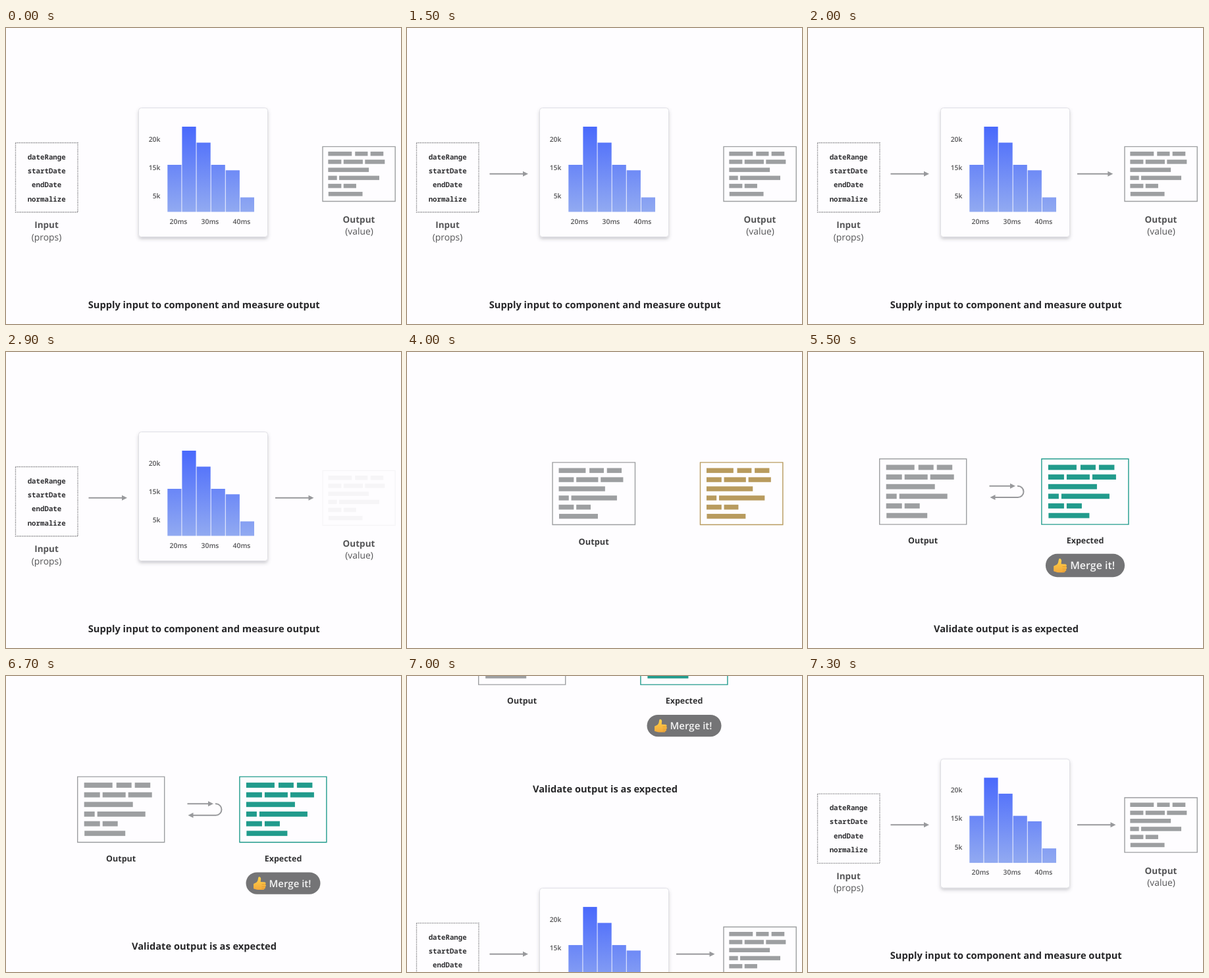
Animation, 600 px wide and 450 px high, one loop 7.4 s. Source, as an HTML page:

```html
<!DOCTYPE html>
<html lang="en">
<head>
<meta charset="utf-8">
<title>Component test flow</title>
<style>
  html, body { margin: 0; width: 100%; height: 100%; overflow: hidden; background: #fefdff; }
  svg { display: block; width: 100%; height: 100%; }
  text { font-family: "Open Sans", "Noto Sans", sans-serif; text-anchor: middle; fill: #555557; text-rendering: geometricPrecision; }
  .caption { font-size: 14.65px; font-weight: 700; fill: #272729; }
  .name { font-size: 13.5px; font-weight: 700; }
  .note { font-size: 13.9px; }
  .axis { font-size: 10.4px; font-weight: 600; }
  .end { text-anchor: end; }
  .code { font: 700 10.75px "Noto Sans Mono", "DejaVu Sans Mono", monospace; fill: #303033; }
  .label { font-size: 12.5px; font-weight: 700; fill: #333335; }
  .merge { font-size: 15px; font-weight: 600; fill: #f4f4f4; text-anchor: start; }
  .line { fill: none; stroke: #98999c; stroke-width: 2; }
  .head { fill: #98999c; }
</style>
</head>
<body>
<svg viewBox="0 0 600 450">
  <defs>
    <linearGradient id="blue" gradientUnits="userSpaceOnUse" x1="0" y1="150" x2="0" y2="280">
      <stop offset="0" stop-color="#4969fc"/>
      <stop offset="1" stop-color="#92aaf1"/>
    </linearGradient>
    <linearGradient id="skin" x1="0" y1="0" x2="0" y2="1">
      <stop offset="0" stop-color="#ffd34a"/>
      <stop offset="1" stop-color="#f2a93b"/>
    </linearGradient>
    <filter id="shadow" x="-10%" y="-10%" width="120%" height="125%">
      <feDropShadow dx="0" dy="3" stdDeviation="2.8" flood-color="#505060" flood-opacity=".28"/>
    </filter>
    <g id="rows"></g>
  </defs>

  <g id="first">
    <g id="parts">
      <rect x="14.5" y="174.5" width="94.5" height="105.5" fill="none" stroke="#77777a" stroke-width="1.3" stroke-dasharray="1.3 1.3"/>
      <g id="props"></g>
      <text class="name" x="61.5" y="304.4">Input</text>
      <text class="note" x="61.5" y="322.9">(props)</text>
      <rect x="201.5" y="121.5" width="196" height="196" rx="4" fill="#fefdff" stroke="#e0e0e5" filter="url(#shadow)"/>
      <g id="bars" fill="url(#blue)"></g>
      <g id="axes"></g>
      <g id="arrowIn"></g>
      <g id="arrowOut"></g>
      <text class="note" x="536.5" y="314.2">(value)</text>
      <text class="caption" x="300.7" y="425.7">Supply input to component and measure output</text>
    </g>
    <g id="result">
      <g id="resultBox"></g>
      <text class="name" x="536" y="296">Output</text>
    </g>
  </g>

  <g id="second">
    <g id="output"></g>
    <g id="expected"></g>
    <text id="outLabel" class="label">Output</text>
    <text id="expLabel" class="label" x="421" y="291">Expected</text>
    <g id="compare">
      <path class="line" d="M275.5 203.7H309M318 203.7h.8a8.7 8.7 0 0 1 0 17.4H283"/>
      <path class="head" d="M307 199.7l8 4-8 4zM284.5 217.1l-8 4 8 4z"/>
    </g>
    <text id="caption" class="caption" x="301" y="425.7">Validate output is as expected</text>
    <g id="pill">
      <rect x="-56.5" y="-16.6" width="113" height="33.2" rx="16.6" fill="#747476"/>
      <path fill="url(#skin)" d="M-45 1L-41-1C-38-3-38.5-6-37.5-9C-37-10.5-34-10-33.8-6.5L-34.3-2L-28.5-1.8C-26-1.5-26 1-27.3 1.8C-25.5 2.5-26 5-27.5 5.2C-26.5 6.5-27 8-28.6 8.2C-28.4 9.5-29.5 10-31 10H-38C-41 10-43 8.5-45 8.2Z"/>
      <path fill="none" stroke="#d98f2c" stroke-width=".7" d="M-32.5 1.8h5M-32.5 5.2h5M-32.5 8.2h4"/>
      <text class="merge" x="-21.5" y="5.5">Merge it!</text>
    </g>
  </g>
</svg>
<script>
const LOOP = 7400;
const GRAY = [157, 159, 161], GOLD = [184, 155, 94], TEAL = [33, 155, 140];
const $ = id => document.getElementById(id);
const clamp = u => Math.max(0, Math.min(1, u));
const ramp = (t, start, span) => clamp((t - start) / span);
const mix = (a, b, u) => a + (b - a) * u;
const inOut = u => u < .5 ? 4 * u ** 3 : 1 - 4 * (1 - u) ** 3;
const outCubic = u => 1 - (1 - u) ** 3;
const outBack = u => 1 + 2.7 * (u - 1) ** 3 + 1.7 * (u - 1) ** 2;
const rgb = (a, b = a, u = 0) => `rgb(${a.map((v, i) => Math.round(mix(v, b[i], u)))})`;
const fade = (id, u) => $(id).setAttribute("opacity", u);
const show = (id, on) => $(id).setAttribute("visibility", on ? "visible" : "hidden");
const move = (id, x, y, s = 1) => $(id).setAttribute("transform", `translate(${x} ${y}) scale(${s})`);
const label = (cls, x, y, s) => `<text class="${cls}" x="${x}" y="${y}">${s}</text>`;

// Text blocks inside a document box: [start, end] pairs per row
const rows = [
  [[10, 53], [59, 82], [87, 110.5]],
  [[10, 34], [38, 73], [77, 113]],
  [[10, 84]],
  [[10, 26], [30, 103]],
  [[10, 34], [38, 61]],
  [[10.5, 72.5]]
];
$("rows").innerHTML = rows.map((row, i) => row.map(([a, b]) =>
  `<rect x="${a}" y="${9 + i * 14.65}" width="${b - a}" height="7.8"/>`).join("")).join("");

for (const id of ["resultBox", "output", "expected"]) {
  $(id).innerHTML = `<rect width="132" height="99.6" fill="none" stroke="currentColor" stroke-width="1.4" vector-effect="non-scaling-stroke"/>
    <use href="#rows" fill="currentColor"/>`;
  $(id).style.color = rgb(GRAY);
}
move("resultBox", 481, 180.4, .835);

$("props").innerHTML = ["dateRange", "startDate", "endDate", "normalize"]
  .map((s, i) => label("code", 61.7, 199.5 + i * 21.4, s)).join("");
$("bars").innerHTML = [208, 150, 174.3, 208, 216.3, 257.5]
  .map((y, i) => `<rect x="${245.3 + i * 22.1}" y="${y}" width="21.2" height="${279.5 - y}"/>`).join("");
$("axes").innerHTML =
  ["20k", "15k", "5k"].map((s, i) => label("axis end", 234.5, 172.5 + i * 43.3, s)).join("") +
  ["20ms", "30ms", "40ms"].map((s, i) => label("axis", 262 + i * 48, 297.8, s)).join("");

function arrow(id, x, u) {
  const tip = x + 58.5 * u;
  show(id, u > 0);
  $(id).innerHTML = `<path class="line" d="M${x} 221.7H${Math.max(x, tip - 6)}"/>
    <path class="head" d="M${tip - 8} 217.7l8 4-8 4z"/>`;
}

function draw(t) {
  const slide = inOut(ramp(t, 6550, 870));
  const travel = inOut(ramp(t, 3550, 781));
  const sliding = slide > 0;

  // Input, component, output
  move("first", 0, sliding ? 450 * (1 - slide) : 0);
  fade("parts", sliding ? 1 : 1 - ramp(t, 3300, 330));
  show("result", sliding || t < 3550);
  fade("resultBox", 1 - .92 * Math.sin(Math.PI * ramp(t, 2500, 800)));
  arrow("arrowIn", 125.5, outCubic(ramp(t, 500, 600)));
  arrow("arrowOut", 409, outCubic(ramp(t, 1650, 600)));

  // Output against expectation
  move("second", 0, -450 * slide);
  show("second", t >= 3550);
  const y = mix(180.4, 162.5, travel), scale = mix(.835, 1, travel);
  move("output", mix(481, 108.7, travel), y, scale);
  move("expected", mix(655, 354.9, travel), y, scale);
  $("expected").style.color = rgb(GOLD, TEAL, ramp(t, 4900, 300));
  const out = $("outLabel");
  out.setAttribute("x", mix(536, 174.7, travel));
  out.setAttribute("y", mix(296, 291, travel));
  out.style.fontSize = mix(13.5, 12.5, travel) + "px";
  out.style.fill = rgb([85, 85, 87], [51, 51, 53], travel);
  fade("expLabel", ramp(t, 4250, 250));
  fade("compare", ramp(t, 4400, 300));
  fade("caption", ramp(t, 4300, 300));
  const pop = ramp(t, 5200, 400);
  fade("pill", clamp(pop * 3));
  move("pill", 421, 324.5, outBack(pop));
}

const began = performance.now();
function tick() {
  draw((performance.now() - began) % LOOP);
  requestAnimationFrame(tick);
}
draw(0);
requestAnimationFrame(tick);
</script>
</body>
</html>
```
